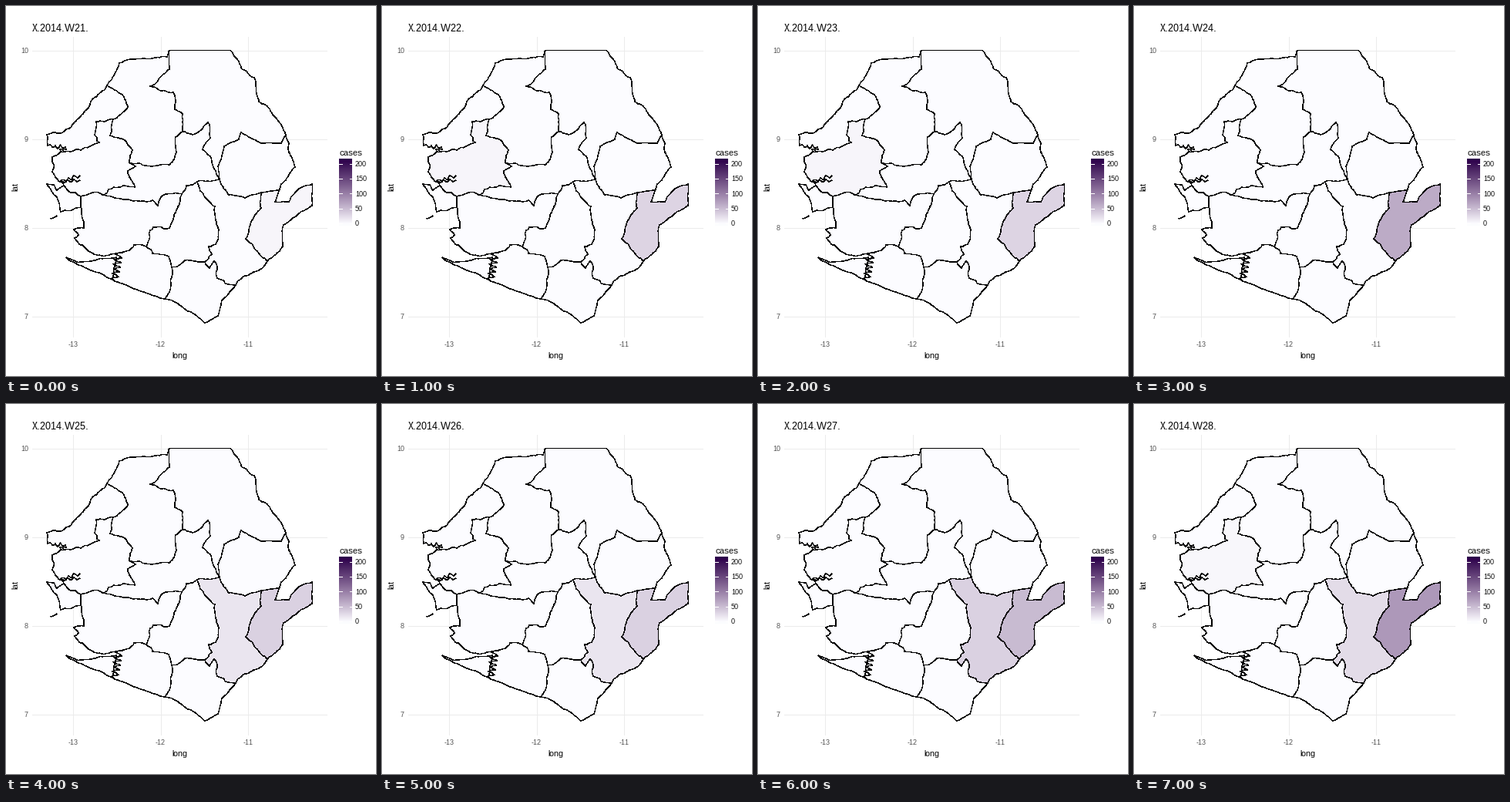
These frames come from a looping animation (480 px wide and 480 px high, 8 s). A matplotlib script:

```python
import numpy as np
import matplotlib.pyplot as plt
from matplotlib.animation import FuncAnimation
from matplotlib.patches import Polygon

PX = 0.75  # points per pixel at 96 dpi
LOW, HIGH = "#FCFCFF", "#2D004B"
MAX_CASES = 212
WHITE = np.array([0.9505, 1.0, 1.089])
RGB_XYZ = np.array([[0.4124, 0.3576, 0.1805],
                    [0.2126, 0.7152, 0.0722],
                    [0.0193, 0.1192, 0.9505]])
rng = np.random.default_rng(11)

plt.rcParams["font.family"] = "Liberation Sans"
plt.rcParams["text.hinting"] = "native"
plt.rcParams["text.hinting_factor"] = 1


# ---- colour scale, blended in Lab ----
def to_lab(hex_code):
    rgb = np.array([int(hex_code[i:i + 2], 16) for i in (1, 3, 5)]) / 255
    lin = np.where(rgb > 0.04045, ((rgb + 0.055) / 1.055) ** 2.4, rgb / 12.92)
    xyz = RGB_XYZ @ lin / WHITE
    x, y, z = np.where(xyz > 0.008856, np.cbrt(xyz), 7.787 * xyz + 16 / 116)
    return np.array([116 * y - 16, 500 * (x - y), 200 * (y - z)])


def to_rgb(lab):
    y = (lab[0] + 16) / 116
    f = np.array([y + lab[1] / 500, y, y - lab[2] / 200])
    xyz = np.where(f > 0.2069, f ** 3, (f - 16 / 116) / 7.787) * WHITE
    lin = np.clip(np.linalg.solve(RGB_XYZ, xyz), 0, 1)
    return np.where(lin > 0.0031308, 1.055 * lin ** (1 / 2.4) - 0.055, 12.92 * lin)


LAB_LOW, LAB_HIGH = to_lab(LOW), to_lab(HIGH)


def shade(cases):
    t = np.clip(cases / MAX_CASES, 0, 1)
    return np.clip(to_rgb(LAB_LOW + t * (LAB_HIGH - LAB_LOW)), 0, 1)


# ---- border lines: a few key points, roughened by midpoint displacement ----
def wiggle(a, b, rough):
    length = np.hypot(*(b - a))
    if length < 4:
        return [b]
    mid = (a + b) / 2 + rng.normal(0, rough * length, 2)
    return wiggle(a, mid, rough) + wiggle(mid, b, rough)


lines = []


def arc(*points, rough=0.07):
    pts = np.array(points, float)
    out = [pts[0]]
    for a, b in zip(pts[:-1], pts[1:]):
        out += wiggle(a, b, rough)
    lines.append(np.array(out))
    return lines[-1]


def inlets(a, b, count, depth):
    """Creeks as a zigzag of seeded depth across the line from a to b."""
    a, b = np.array(a, float), np.array(b, float)
    side = np.array([a[1] - b[1], b[0] - a[0]]) / np.hypot(*(b - a))
    mids = [a + (b - a) * k / count
            + side * depth * (-1) ** k * rng.uniform(0.4, 1)
            for k in range(1, count)]
    return arc(a, *mids, b, rough=0.1)


def ring(*arcs):
    return np.concatenate(arcs)


# meeting points of the borders
NORTH, NORTH_END, NORTH_WEST = (212, 57.5), (291, 57.5), (131, 103)
HILL, HUB, BEND, FORK = (363, 167), (277, 225), (357, 231), (331, 242)
SOUTH_EAST, CORNER, TIP = (339, 331), (298, 362), (206, 380)
WEST, CREEK, BAY, MOUTH = (71, 189), (75, 233), (97, 247), (97, 261)
FERRY, SHORE, DELTA = (139, 147), (141, 357), (147, 320)
LAKE, FORD, PASS, MILL = (160, 203), (128, 245), (229, 163), (248, 228)
CROSS, KNEE, FOOT, BANK = (228, 244), (215, 339), (258, 332), (182, 312)

# outer edge
top = arc(NORTH, NORTH_END, rough=0)
north_east = arc(NORTH_END, (302, 72), (324, 99), (328, 124), (348, 143), HILL)
upper_east = arc(HILL, (366, 183), (375, 209), BEND)
far_east = arc(BEND, (349, 254), (367, 254), (384, 235), (397, 231), (397, 259),
               (379, 270), (360, 284), (359, 312), SOUTH_EAST, rough=0.05)
south_east = arc(SOUTH_EAST, (316, 348), CORNER)
south = arc(CORNER, (280, 382), (275, 402), (258, 411), (240, 397), TIP,
            rough=0.04)
beach = arc(TIP, (160, 364), SHORE, rough=0.02)
lagoon = inlets(SHORE, DELTA, 12, 6)
south_west = arc(DELTA, (124, 324), (103, 314), (89, 301), (94, 297), (88, 290),
                 (101, 288), MOUTH)
peninsula = arc(MOUTH, (71, 267), (66, 248), (53, 231), (62, 232), (66, 239),
                CREEK, rough=0.04)
shore = arc(CREEK, (80, 239), BAY)
west = ring(arc(WEST, (60, 196), (60, 215), (70, 228)),
            inlets((70, 228), (96, 220), 7, 3),
            inlets((96, 226), (72, 228), 6, 3),
            arc((72, 228), CREEK))
north_coast = ring(arc((53, 167), (54, 181)), inlets((54, 181), (77, 183), 7, 3),
                   inlets((77, 183), WEST, 5, 4))
north_west = arc(NORTH_WEST, (125, 110), (110, 124), (94, 146), (76, 162),
                 (53, 167))
upper_north = arc(NORTH, (209, 66), (178, 68), (147, 74), (141, 88), NORTH_WEST,
                  rough=0.05)

# inner borders
coast_split = arc(WEST, (97, 187), (121, 177), (115, 167), (117, 150), FERRY)
river = arc(NORTH_WEST, (151, 115), (158, 130), FERRY)
loop = arc(FERRY, (135, 168), (155, 175), (164, 187), LAKE)
west_edge = arc(LAKE, (168, 208), (158, 214), (167, 235), (133, 238), FORD)
west_foot = arc(BAY, (110, 243), FORD)
north_split = arc(NORTH, (212, 82), (187, 104), (217, 112), (219, 134),
                  (229, 140), PASS)
mid_split = arc(PASS, (220, 170), (221, 190), (212, 206), (190, 208), LAKE)
hook = arc(PASS, (242, 167), (262, 151), (265, 171), (255, 186), (265, 195),
           HUB)
upper_east_top = arc(HUB, (275, 208), (283, 182), (302, 173), (305, 164),
                     (331, 178), (357, 178), HILL, rough=0.05)
upper_east_foot = arc(HUB, (289, 245), (310, 249), FORK)
east_top = arc(FORK, (354, 239), BEND)
east_edge = arc(FORK, (331, 262), (317, 284), (311, 302), (326, 318), SOUTH_EAST)
inner_top = arc(MILL, (262, 227), HUB)
inner_edge = arc(MILL, (252, 240), (271, 260), (276, 290), (272, 309),
                 (263, 312), (267, 322), FOOT)
inner_foot = arc(FOOT, (264, 340), (270, 331), (274, 353), CORNER)
centre_top = arc(FORD, (158, 251), (190, 252), (197, 259), (203, 246), CROSS)
centre_head = arc(CROSS, (234, 233), MILL)
centre_edge = arc(CROSS, (223, 260), (212, 288), (187, 291), BANK)
centre_side = arc(BANK, (190, 321), (211, 325), KNEE)
centre_foot = arc(KNEE, (238, 330), FOOT)
south_split = arc(KNEE, (214, 362), TIP)
delta_top = arc(DELTA, (160, 317), (166, 310), BANK)
peninsula_edge = arc(BAY, MOUTH)
island = arc((78, 326), (94, 336), (138, 355), (140, 340), (143, 326), (110, 331),
             (92, 332), (78, 326), rough=0.04)
islet = arc((58, 276), (66, 272))

country = ring(top, north_east, upper_east, far_east, south_east, south, beach,
               lagoon, south_west, peninsula, west[::-1], north_coast[::-1],
               north_west[::-1], upper_north[::-1])
areas = {
    "east": ring(east_top, far_east, east_edge[::-1]),
    "inner": ring(inner_top, upper_east_foot, east_edge, south_east,
                  inner_foot[::-1], inner_edge[::-1]),
    "west": ring(west, shore, west_foot, west_edge[::-1], loop[::-1],
                 coast_split[::-1]),
}

# weekly cases per coloured area, weeks 21 to 28
CASES = {
    "east": [5, 31, 31, 64, 33, 33, 51, 79],
    "inner": [0, 0, 0, 0, 18, 18, 33, 25],
    "west": [0, 5, 5, 0, 0, 0, 0, 4],
}

# ---- stage ----
fig = plt.figure(figsize=(5, 5), dpi=96, facecolor="white")
ax = fig.add_axes([0, 0, 1, 1])
ax.axis("off")


def label(x, y, text, size, **kw):
    return ax.text(x, y, text, fontsize=size * PX, va="baseline", **kw)


def stroke(x, y, color, z, width=1, **kw):
    ax.plot(x, y, color=color, lw=width * PX, zorder=z, antialiased=False,
            solid_capstyle="butt", **kw)


for deg in (10, 9, 8, 7):
    y = 58 + 115 * (10 - deg)
    stroke([34, 416], [y, y], "#EBEBEB", 0)
    label(29, y + 3, str(deg), 9, color="#4D4D4D", ha="right")
for deg in (-13, -12, -11):
    x = 87 + 113.5 * (deg + 13)
    stroke([x, x], [40, 429], "#EBEBEB", 0)
    label(x, 442, str(deg), 9, color="#4D4D4D", ha="center")
label(225, 457, "long", 11, ha="center")
label(15, 234, "lat", 11, ha="center", rotation=90, rotation_mode="anchor")
title = label(33.5, 33, "", 13)

# legend
label(432, 194, "cases", 11)
ZERO_Y, UNIT = 282.2, 0.388
rows = np.arange(198, 285) + 0.5
bar = np.array([[shade((ZERO_Y - y) / UNIT)] for y in rows])
ax.imshow(bar, extent=(432, 449, 285, 198), aspect="auto",
          interpolation="nearest", zorder=1)
for n in range(0, 201, 50):
    y = ZERO_Y - n * UNIT
    stroke([432, 435.5], [y, y], "white", 2)
    stroke([445.5, 449], [y, y], "white", 2)
    label(453, y + 3.2, str(n), 9)

# map
for shape in (country, island):
    ax.add_patch(Polygon(shape, facecolor=LOW, lw=0, zorder=3))
fills = {name: ax.add_patch(Polygon(shape, lw=0, zorder=4, antialiased=False))
         for name, shape in areas.items()}
for line in lines:
    stroke(line[:, 0], line[:, 1], "black", 5, width=0.4, snap=False)

ax.set_xlim(0, 480)
ax.set_ylim(480, 0)


def update(week):
    title.set_text(f"X.2014.W{21 + week}.")
    for name, patch in fills.items():
        patch.set_facecolor(shade(CASES[name][week]))
    return [title, *fills.values()]


anim = FuncAnimation(fig, update, frames=8, interval=1000, repeat=True,
                     repeat_delay=0, blit=False)
plt.show()
```
